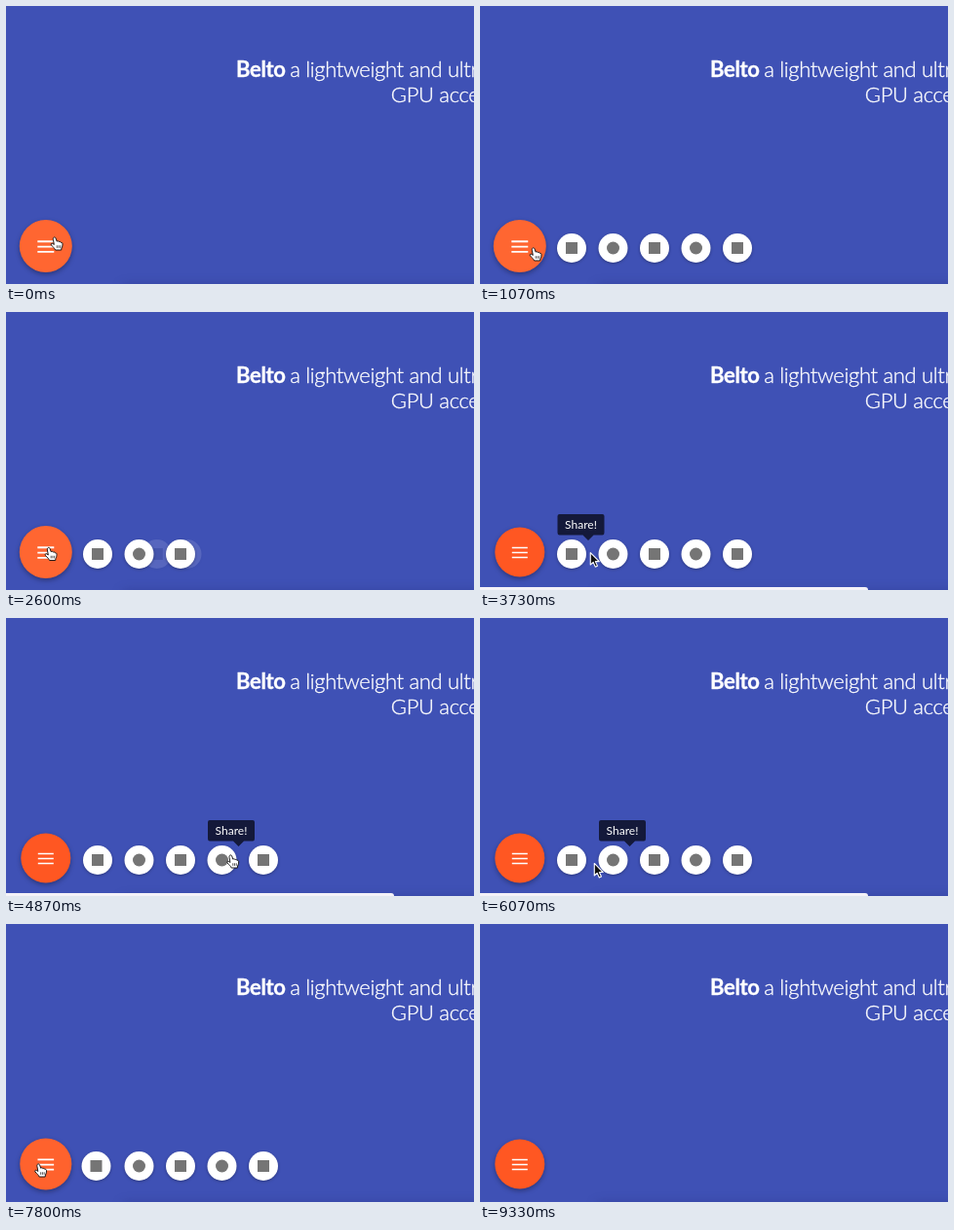
These frames come from a looping animation (480 by 286 pixels, 9390 ms). An HTML page:

```html
<!DOCTYPE html>
<html lang="en">
<head>
<meta charset="utf-8">
<title>Floating menu</title>
<style>
  html, body { margin: 0; width: 100%; height: 100%; overflow: hidden; background: #3f51b5; }
  svg { display: block; width: 100vw; height: 100vh; }
  text { font-family: Lato, sans-serif; fill: #fff; }
  .head { font-size: 22px; font-weight: 300; letter-spacing: -.33px; stroke: #fff; stroke-width: .35px; }
  .name { font-weight: 700; }
  .disc { filter: drop-shadow(0 1.5px 1.5px rgba(0, 0, 0, .3)); }
  #main { filter: drop-shadow(0 2.5px 2.5px rgba(0, 0, 0, .32)); }
  #shade { filter: blur(6px); }
</style>
</head>
<body>
<svg viewBox="0 0 480 286">
  <rect width="480" height="286" fill="#3f51b5"/>
  <rect id="shade" x="120" y="288" width="400" height="30" fill="#141e64" fill-opacity=".35"/>
  <text class="head name" x="286.700" y="72.500" text-anchor="end">Belto</text>
  <text class="head" x="291.200" y="72.500">a lightweight and ultra fast</text>
  <text class="head" x="394.800" y="98.500">GPU accelerated</text>
  <g id="items"></g>
  <g id="main">
    <circle r="25.5"/>
    <path d="M-8 -4.500H8M-8 .5H8M-8 5.500H8" stroke="#fff" stroke-width="1.700"/>
  </g>
  <g id="tip">
    <path d="M2 208H46Q48 208 48 210V227Q48 229.500 46 229.500H37L31.500 235L26 229.500H2Q0 229.500 0 227V210Q0 208 2 208Z" fill="#14193a"/>
    <text x="24" y="223" text-anchor="middle" font-size="12">Share!</text>
  </g>
  <path id="bar" d="M0 283H395Q398 283 398 286V290H0Z" fill="#f4f2f8"/>
  <g id="hand">
    <g transform="scale(.87)">
      <path d="M-1.600 .6C-.8 -.6 .7 -.3 1.200 1L2.500 4.800C3.500 4 4.700 4.300 5 5.300C6 4.700 7.100 5.200 7.300 6.200C8.400 5.800 9.300 6.600 9.200 8C9.100 10 9 11 8 12.700L7.700 15H.7C-.2 12.800 -2 11.600 -4 9.200C-5.200 7.700 -3.500 6.500 -2.200 7.500L-.8 8.600L-1.800 2.700C-2 1.800 -2 1.200 -1.600 .6Z" fill="#fff" stroke="#111" stroke-width="1.100" stroke-linejoin="round"/>
      <path d="M2.500 9.500V12.500M4.500 9.500V12.500M6.500 9.500V12.500" stroke="#111" stroke-width=".8"/>
    </g>
  </g>
  <path id="arrow" d="M0 0V12.500L2.900 9.900L5 14.600L7.200 13.600L5.100 9.100H9Z" fill="#111" stroke="#fff" stroke-width="1.100" stroke-linejoin="round"/>
</svg>
<script>
const LOOP = 9390, STEP = 1000 / 15;
const HOME = { x: 40.8, y: 247 }, ROW = 249;
const COUNT = 5, TRAVEL = 280, LAG = 69, GHOST = .12;
const $ = id => document.getElementById(id);
const clamp = v => Math.max(0, Math.min(1, v));
const mix = (a, b, k) => a + (b - a) * k;
const place = (el, x, y) => el.setAttribute('transform', `translate(${x} ${y})`);
const show = (el, on) => el.style.display = on ? '' : 'none';
const slotX = i => 94 + i * 42.5;

// time, x, y of the pointer
const path = [
  [0, 50, 238], [350, 50, 238], [1070, 55, 249], [1500, 48, 244], [2100, 44, 242.5],
  [2700, 44, 242.5], [3100, 60, 248], [3550, 94, 248], [3950, 136, 247], [4400, 179, 245],
  [4870, 231, 244], [5150, 264, 247], [5450, 264, 248], [5800, 179, 250], [6070, 116.5, 252.5],
  [6350, 96, 251], [6850, 93, 250], [7150, 90, 268], [7600, 80, 262], [7800, 33.5, 247],
  [8150, 35, 246], [8850, 66, -30]
];
// menu toggles: time and whether it opens
const toggles = [[-2000, false], [300, true], [1500, false], [2157, true], [7782, false]];

function pointer(t) {
  const n = path.findIndex(p => p[0] > t);
  if (n < 0) return { x: path.at(-1)[1], y: path.at(-1)[2] };
  const b = path[n], a = path[Math.max(0, n - 1)];
  const k = b === a ? 0 : (t - a[0]) / (b[0] - a[0]);
  return { x: mix(a[1], b[1], k), y: mix(a[2], b[2], k) };
}

function itemState(i, t) {
  const [start, opens] = toggles.findLast(e => e[0] <= t) || toggles[0];
  const u = clamp((t - start - i * LAG) / TRAVEL);
  const p = u ** 1.3;
  return opens
    ? { p, alpha: u ? mix(GHOST, 1, clamp((u - .85) / .15)) : 0 }
    : { p: 1 - p, alpha: u < 1 ? Math.max(GHOST, 1 - Math.max(0, u - .07) * 8) : 0 };
}

const near = (p, x, y, r) => Math.hypot(p.x - x, p.y - y) < r;
const overMain = t => near(pointer(t), HOME.x, HOME.y, 26);

function overItem(t) {
  const p = pointer(t);
  for (let i = 0; i < COUNT; i++)
    if (itemState(i, t).p === 1 && near(p, slotX(i), ROW, 15)) return i;
  return -1;
}

function glow(t) {
  let sum = 0;
  for (let k = 0; k < 20; k++) sum += overMain(t - k * 10);
  return sum / 20;
}

function tooltip(t) {
  const fades = [1, 1, .6, .2];
  for (let k = 0; k < fades.length; k++) {
    const i = overItem(t - k * 70);
    if (i >= 0) return { i, alpha: fades[k] };
  }
  return { i: 0, alpha: 0 };
}

const glyphs = ['<rect x="-6" y="-6" width="12" height="12"/>', '<circle r="6.5"/>'];
$('items').innerHTML = Array.from({ length: COUNT }, (_, i) =>
  `<g><circle class="disc" r="15" fill="#fff"/><g fill="#757575">${glyphs[i % 2]}</g></g>`
).reverse().join('');
const items = [...$('items').children].reverse();

function draw(t) {
  items.forEach((el, i) => {
    const s = itemState(i, t);
    place(el, mix(HOME.x, slotX(i), s.p), ROW);
    el.setAttribute('opacity', s.alpha);
  });

  const h = glow(t), main = $('main');
  main.setAttribute('transform',
    `translate(${HOME.x} ${HOME.y}) scale(${mix(1, 27 / 25.5, h)})`);
  main.firstElementChild.setAttribute('fill', `rgb(255 ${mix(87, 102, h)} ${mix(34, 49, h)})`);

  const tip = tooltip(t);
  place($('tip'), slotX(tip.i) - 15 + .5, 0);
  $('tip').setAttribute('opacity', tip.alpha);

  const up = clamp((t - 3480) / 130) * (1 - clamp((t - 6950) / 200));
  place($('bar'), 0, 4 * (1 - up));

  const p = pointer(t), link = overMain(t) || overItem(t) >= 0;
  show($('hand'), link);
  show($('arrow'), !link);
  place($('hand'), p.x, p.y);
  place($('arrow'), p.x, p.y);
}

function tick() {
  const t = performance.now() % LOOP;
  draw(Math.floor((t + 4) / STEP) * STEP);
  requestAnimationFrame(tick);
}
tick();
</script>
</body>
</html>
```
